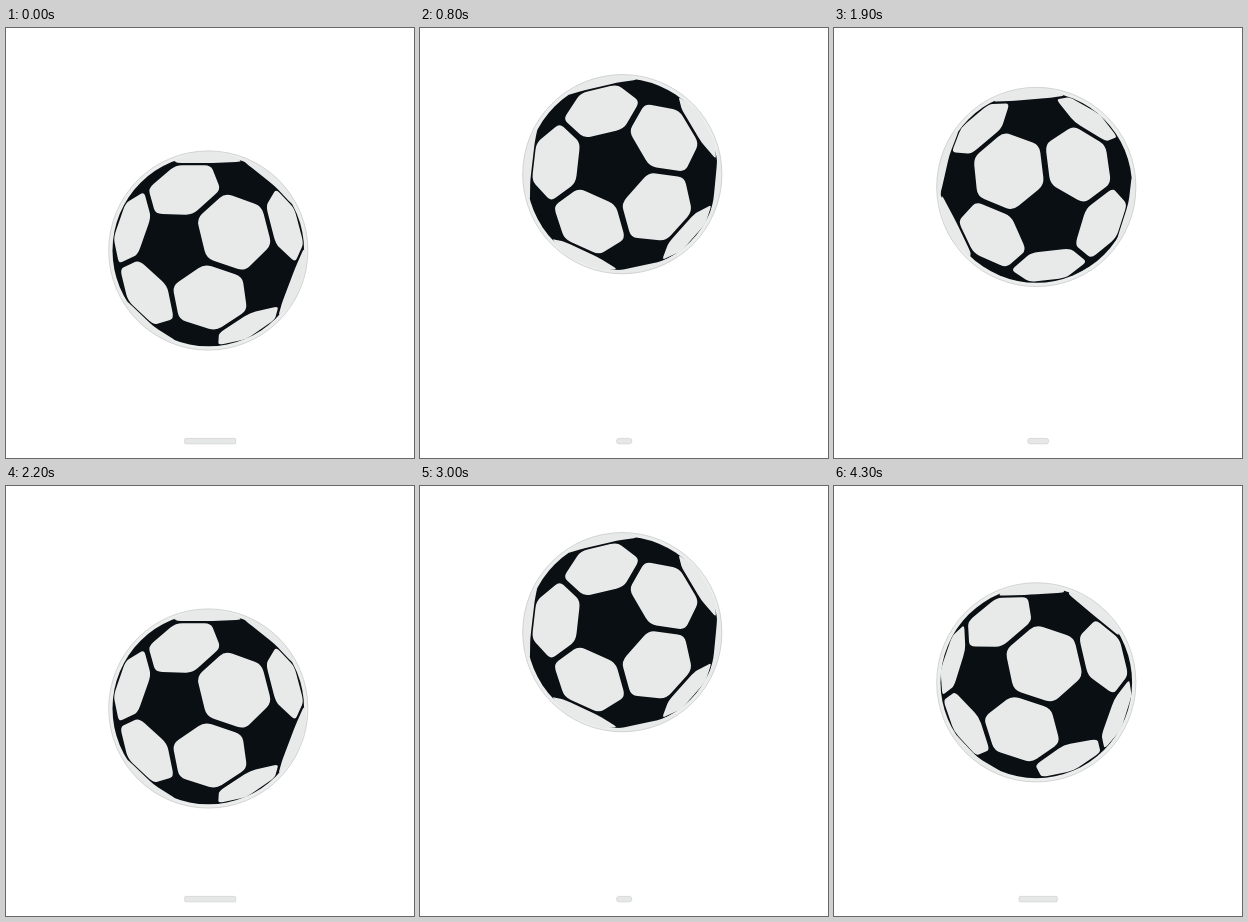
An HTML page with a canvas for the animation above (4.4 s loop, 408 px wide and 430 px high).

```html
<!DOCTYPE html>
<html lang="en">
<head>
<meta charset="utf-8">
<title>Bouncing ball</title>
<style>
  html, body { margin: 0; width: 100%; height: 100%; overflow: hidden; background: #fff; }
  canvas { display: block; }
</style>
</head>
<body>
<canvas id="stage" width="408" height="430"></canvas>
<script>
const ctx = document.getElementById('stage').getContext('2d');
const TAU = Math.PI * 2, STEP = 100, FRAMES = 22, PHASES = 24, APEX = 14;
const INK = '#0a0f13', PANEL = '#e8eaea', RIM = '#c9cbcb';
const BALL_X = 202.3, BALL_R = 99.6, INK_R = 95.8, PANEL_R = 0.375;
const EYE = 7, ZOOM = INK_R * Math.sqrt(EYE * EYE - 1);

// Vectors and quaternions [w, x, y, z]; x right, y down, z towards the viewer
const dot = (a, b) => a.reduce((sum, v, i) => sum + v * b[i], 0);
const unit = a => a.map(v => v / Math.hypot(...a));
const cross = (a, b) => [
  a[1] * b[2] - a[2] * b[1], a[2] * b[0] - a[0] * b[2], a[0] * b[1] - a[1] * b[0]];
const mul = ([a, b, c, d], [e, f, g, h]) => [
  a * e - b * f - c * g - d * h, a * f + b * e + c * h - d * g,
  a * g - b * h + c * e + d * f, a * h + b * g - c * f + d * e];
const turn = (axis, angle) =>
  [Math.cos(angle / 2), ...unit(axis).map(v => v * Math.sin(angle / 2))];
const rotate = (q, v) => mul(mul(q, [0, ...v]), [q[0], -q[1], -q[2], -q[3]]).slice(1);

function slerp(a, b, u) {
  let d = dot(a, b);
  if (d < 0) { b = b.map(v => -v); d = -d; }
  const angle = Math.acos(Math.min(1, d));
  if (angle < 1e-4) return a;
  return a.map((v, i) =>
    (v * Math.sin((1 - u) * angle) + b[i] * Math.sin(u * angle)) / Math.sin(angle));
}

// The twelve black spots are icosahedron corners
const Z = [0, 0, 1];
const spots = [Z, [0, 0, -1]];
for (let i = 0; i < 5; i++) {
  const z = Math.sqrt(0.2), r = 2 * z, up = (i + 0.5) * TAU / 5, down = i * TAU / 5;
  spots.push([r * Math.cos(up), r * Math.sin(up), z],
             [r * Math.cos(down), r * Math.sin(down), -z]);
}

// One white panel between every three neighbouring spots
const panels = [];
const near = (a, b) => dot(a, b) > 0.4;
spots.forEach((a, i) => spots.slice(i + 1).forEach((b, j) =>
  spots.slice(i + j + 2).forEach(c => {
    if (!near(a, b) || !near(a, c) || !near(b, c)) return;
    const mid = unit(a.map((v, k) => v + b[k] + c[k]));
    const u = unit(a.map((v, k) => v - mid[k] * dot(a, mid)));
    const w = cross(mid, u), height = Math.sqrt(1 - PANEL_R ** 2);
    const corners = Array.from({ length: 6 }, (_, n) => {
      const t = (n + 0.5) * TAU / 6;
      return mid.map((v, k) =>
        v * height + PANEL_R * (u[k] * Math.cos(t) + w[k] * Math.sin(t)));
    });
    panels.push({ mid, corners });
  })));

// Turns that leave the pattern unchanged
const symmetries = [[1, 0, 0, 0]];
const generators = [turn(Z, TAU / 5), turn(spots[2], TAU / 5)];
for (const s of symmetries) for (const g of generators) {
  const next = mul(s, g);
  if (!symmetries.some(o => Math.abs(dot(o, next)) > 0.99)) symmetries.push(next);
}

// Key poses: phase, position of one spot, roll in degrees
const poses = [
  [0, -0.36, -0.032, -15], [3, 0.157, -0.012, -14.6], [8, -0.115, -0.082, -30.2],
  [16, 0.2, -0.11, -41.2], [21, 0.128, 0.334, 13.4], [23, -0.53, -0.032, -15]
].map(([phase, x, y, roll]) => {
  const tilt = unit([1 + Math.sqrt(1 - x * x - y * y), -y, x, 0]);
  return { phase, q: mul(tilt, turn(Z, roll * TAU / 360)) };
});
poses.push({ phase: PHASES, q: poses[0].q });

const segments = poses.slice(1).map((end, i) => {
  const start = poses[i];
  const guess = mul(turn([0.13, 0.96, 0.2], 0.185 * (end.phase - start.phase)), start.q);
  const closeness = q => Math.abs(dot(q, guess));
  const to = symmetries.map(s => mul(end.q, s))
    .reduce((best, q) => closeness(q) > closeness(best) ? q : best);
  return { from: start.phase, until: end.phase, a: start.q, b: to };
});

function orientation(phase) {
  const s = segments.find(s => phase < s.until);
  return slerp(s.a, s.b, (phase - s.from) / (s.until - s.from));
}

function disc(radius, color) {
  ctx.beginPath();
  ctx.arc(0, 0, radius, 0, TAU);
  ctx.fillStyle = color;
  ctx.fill();
}

// Perspective; points behind the visible edge are mirrored outside it
function project([x, y, z]) {
  const scale = ZOOM / (EYE - z), r = Math.hypot(x, y) * scale;
  const k = z < 1 / EYE ? scale * (2 * INK_R - r) / r : scale;
  return [x * k, y * k];
}

function drawPanel(points) {
  const mix = (a, b, u) => [a[0] + (b[0] - a[0]) * u, a[1] + (b[1] - a[1]) * u];
  ctx.beginPath();
  points.forEach((p, i) => {
    const before = points[(i + 5) % 6], after = points[(i + 1) % 6];
    ctx.lineTo(...mix(p, before, 0.19));
    ctx.quadraticCurveTo(...p, ...mix(p, after, 0.19));
  });
  ctx.closePath();
  ctx.fillStyle = PANEL;
  ctx.fill();
}

function drawBall(phase, y, sx, sy) {
  const q = orientation(phase);
  ctx.save();
  ctx.translate(BALL_X, y);
  ctx.scale(sx, sy);
  disc(BALL_R, '#eceeee');
  disc(INK_R, INK);
  ctx.save();
  ctx.beginPath();
  ctx.arc(0, 0, BALL_R, 0, TAU);
  ctx.clip();
  for (const { mid, corners } of panels) {
    if (rotate(q, mid)[2] > -0.15) drawPanel(corners.map(c => project(rotate(q, c))));
  }
  ctx.restore();
  ctx.beginPath();
  ctx.arc(0, 0, BALL_R, 0, TAU);
  ctx.strokeStyle = RIM;
  ctx.lineWidth = 0.8;
  ctx.stroke();
  ctx.restore();
}

function drawShadow(distance) {
  const w = 7 + 44 * (distance / 10) ** 3.25;
  ctx.beginPath();
  ctx.roundRect(204.2 - w / 2, 410.4, w, 5.4, Math.min(2.7, 45 / w));
  ctx.fillStyle = '#e6e7e7';
  ctx.fill();
  ctx.strokeStyle = '#d2d3d3';
  ctx.lineWidth = 0.8;
  ctx.stroke();
}

function draw(now) {
  const frame = Math.floor(now / STEP) % FRAMES;
  // The motion skips one phase after the apex and one in the fall
  const phase = frame + (frame >= 15) + (frame >= 19);
  const d = Math.min(Math.abs(phase - APEX), PHASES - Math.abs(phase - APEX));
  let y = 118 + 0.635 * d ** 2 + 0.0041 * d ** 4, sx = 1, sy = 1;
  if (d === 11) [y, sx, sy] = [259, 0.925, 1.072];
  if (d === 12) [y, sx, sy] = [298, 1.09, 0.92];
  ctx.clearRect(0, 0, 408, 430);
  drawShadow(d);
  drawBall(phase, y, sx, sy);
}

const begin = performance.now();
function tick() {
  draw(performance.now() - begin);
  requestAnimationFrame(tick);
}
tick();
</script>
</body>
</html>
```
